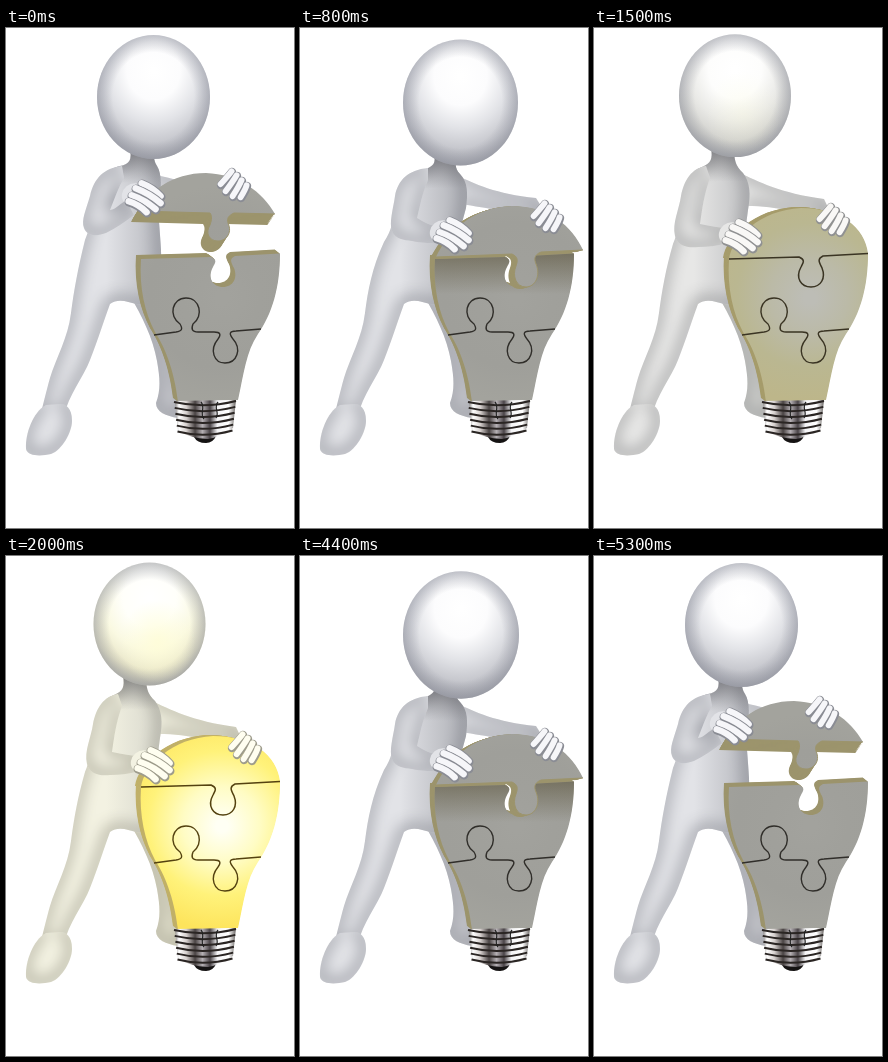
An HTML page with a canvas for the animation above (5400 ms loop, 288 px wide and 500 px high).

```html
<!DOCTYPE html>
<html lang="en">
<head>
<meta charset="utf-8">
<title>Light bulb puzzle</title>
<style>
html, body { margin: 0; width: 100%; height: 100%; overflow: hidden; background: #fff; }
canvas { display: block; }
</style>
</head>
<body>
<canvas id="stage" width="288" height="500"></canvas>
<script>
const ctx = document.getElementById('stage').getContext('2d');
const LOOP = 5400, STEP = 100, FAR = 1000;

// Timelines: [ms, values...]. Pose: 0 lifted, 1 sliding in, 2 fitted.
const POSE = [[0, 0], [100, .04], [600, .52], [700, .9], [800, 1], [1100, 1.6], [1200, 1.92], [1300, 2], [3900, 2],
  [4000, 1.6], [4300, 1], [4400, 1], [4500, .75], [5100, .06], [5300, 0], [5400, 0]];
const LIGHT = [[0, 0], [1300, 0], [2000, 1], [3900, 1], [4000, .93], [4400, 0], [5400, 0]];
const HEAD = [[0, 147.5, 69, 56.5], [300, 149, 67.5, 56.5], [700, 161, 78, 58], [800, 160.5, 74.5, 57.5], [1200, 142, 67.5, 56],
  [1300, 140, 67.5, 56], [2000, 143.5, 68, 56], [3900, 143.5, 68, 56], [4000, 148, 70.5, 57], [4400, 161, 79, 58],
  [5100, 148, 69.5, 56.5], [5300, 147.5, 69, 56.5], [5400, 147.5, 69, 56.5]];

// Shapes that change with the pose, one path per pose
const LOWER_BODY = ' C72 240 68 262 65 285 C62 310 50 330 44 350 C40 364 38 374 34 388 L58 388 C62 368 78 348 84 332 C92 312 98 292 104 276 C112 270 122 274 130 276 C140 278 150 276 156 270';
const BODY = [
  'M124 120 C126 132 124 136 114 138 C98 142 92 152 88 170 C86 190 84 200 79 212' + LOWER_BODY + ' L155 222 C154 205 153 195 152 180 C156 160 156 146 151 138 C147 132 148 126 148 120',
  'M134 126 C136 135 134 138 124 142 C106 146 100 156 97 172 C94 190 92 202 84 214' + LOWER_BODY + ' L157 222 C158 208 162 195 166 180 C168 166 168 154 160 146 C154 140 156 134 156 126',
  'M117 120 C119 131 117 135 108 139 C96 143 92 154 89 170 C87 190 84 204 79 216' + LOWER_BODY + ' L150 222 C150 210 152 198 154 182 C157 166 156 154 149 145 C141 138 140 130 140 120'];
const NEAR_ARM = [
  'M116 138 C98 140 88 150 84 168 C80 182 75 192 78 200 C81 209 92 208 100 205 C110 200 120 193 128 187 L120 172 C112 178 108 182 104 182 C108 172 112 160 118 150',
  'M128 140 C108 142 98 152 95 168 C93 182 89 194 92 203 C95 211 104 212 112 213 C122 215 128 215 136 215 L138 198 C130 198 124 194 117 190 C120 178 122 166 128 152',
  'M112 138 C98 140 90 152 87 168 C85 182 78 195 81 208 C84 219 95 220 104 219 C114 219 122 218 130 216 L134 200 C126 200 116 198 106 196 C108 182 110 166 116 150'];
const FAR_ARM = [
  'M146 146 C165 150 190 158 222 160 L228 170 C196 172 172 168 150 170',
  'M156 147 C175 156 196 166 236 170 L246 186 C210 186 190 180 160 176',
  'M144 144 C165 154 186 165 230 171 L238 188 C204 186 186 178 152 178'];
const SEAM = [
  'M269 186 L228 185 C222 188 221 190 222 195 C227 206 219 213 212 213 C203 213 199 205 204 197 C206 191 206 188 204 185 L132 183',
  'M283 222 L241 224 C234 227 234 231 236 236 C241 248 235 259 226 259 C216 259 212 248 216 238 C218 232 218 229 212 226 L136 229',
  'M274 225.5 L229 228 C223 231 225 234 228 240 C232 250 227 259 217 259 C207 259 201 250 207 239 C209 235 212 232 205 229 L135 231'];
const CAP = [
  ' C142 164 166 145 200 145 C232 146 257 164 269 186',
  ' C148 204 172 179 212 178 C249 178 272 198 283 222',
  ' C138 210 166 182 207 180 C246 180 271 199 274 225.5'];
const DEPTH = ['-7 11', '-6 2', '-6 -1'];
const NEAR_HAND = ['-14 -37', '0 0', '-5 2'];
const FAR_HAND = ['-19 -32', '0 0', '-8 3'];

// Fixed shapes
const GLASS = SEAM[2] + ' C133 260 139 285 149 304 C158 318 168 340 172 374 L232 372 C238 345 240 324 252 306 C266 286 274 260 274 225.5 Z';
const LOWER_SEAM = 'M148 307 L170 304 C176 303 177 301 174 296 C162 288 166 270 180 270 C194 270 198 288 187 296 C185 301 186 304 192 304 L208 304 C215 304 215 307 212 311 C203 322 208 335 219 335 C231 335 236 321 227 311 C223 306 223 303 230 303 L255 301';
const FAR_LEG = 'M124 268 C136 288 147 310 151 333 C154 350 155 362 150 375 C150 384 160 388 172 390 L180 380 L170 330 L150 270';
const FOOT = 'M40 377 C27 384 19 406 20 421 C22 429 36 428 45 426 C56 422 66 404 66 393 C66 380 60 376 54 376';
const NEAR_FINGERS = [[150, 193, 169, 206], [144, 198, 169, 213], [140, 205, 164, 219], [137, 211, 155, 222]];
const FAR_FINGERS = [[245, 176, 234, 189], [250, 180, 239, 196], [255, 185, 246, 201], [260, 190, 254, 202]];

const lerp = (a, b, f) => a + (b - a) * f;
const mix = (a, b, f) => `rgb(${a.map((v, i) => Math.round(lerp(v, b[i], f)))})`;

function track(keys, t) {
  const i = Math.max(1, keys.findIndex(k => k[0] > t)), a = keys[i - 1], b = keys[i];
  const f = (t - a[0]) / (b[0] - a[0]);
  return a.slice(1).map((v, n) => lerp(v, b[n + 1], f));
}

function morph(list, p) {
  const i = Math.min(1, Math.floor(p)), next = list[i + 1].match(/-?[\d.]+/g);
  let k = 0;
  return list[i].replace(/-?[\d.]+/g, n => lerp(+n, +next[k++], p - i).toFixed(2));
}
const point = (list, p) => morph(list, p).split(' ').map(Number);

function gradient(g, stops) {
  stops.forEach(([at, colour]) => g.addColorStop(at, colour));
  return g;
}

// Rounded, softly lit form: darkened towards its outline
function clay(d, base, shade, extra) {
  const path = new Path2D(d);
  ctx.save();
  ctx.fillStyle = base;
  ctx.fill(path);
  ctx.clip(path);
  ctx.translate(-FAR, 0);
  ctx.shadowOffsetX = FAR - 1;
  ctx.shadowOffsetY = -1;
  ctx.shadowBlur = 15;
  ctx.shadowColor = shade;
  ctx.lineWidth = 7;
  ctx.stroke(path);
  ctx.translate(FAR, 0);
  ctx.shadowColor = 'transparent';
  if (extra) extra();
  ctx.restore();
}

function fill(d, colour) {
  ctx.fillStyle = colour;
  ctx.fill(new Path2D(d));
}

function extrude(d, [dx, dy], colour) {
  for (let k = 10; k > 0; k--) {
    ctx.save();
    ctx.translate(dx * k / 10, dy * k / 10);
    fill(d, colour);
    ctx.restore();
  }
}

function line(d, colour, width) {
  ctx.strokeStyle = colour;
  ctx.lineWidth = width;
  ctx.stroke(new Path2D(d));
}

function fingers(list, [dx, dy], width, base, shade) {
  ctx.save();
  ctx.translate(dx, dy);
  ctx.lineCap = 'round';
  for (const [x, y, u, v] of list) {
    const bend = `Q${(x + u) / 2 + 2} ${(y + v) / 2 - 2} ${u} ${v}`;
    line(`M${x} ${y} ${bend}`, shade, width);
    ctx.translate(-.4, -.8);
    line(`M${x} ${y} ${bend}`, base, width - 2.6);
    ctx.translate(.4, .8);
  }
  ctx.restore();
}

function screw() {
  const chrome = gradient(ctx.createLinearGradient(168, 0, 230, 0), [[0, '#6b6664'], [.08, '#fff'], [.2, '#d6d0ce'],
    [.34, '#4a4444'], [.46, '#b5b0b4'], [.58, '#4a4448'], [.7, '#f4f4f6'], [.88, '#fff'], [1, '#6a6664']]);
  fill('M188 409 L210 408 Q207 415 200 415 Q191 415 188 409 Z', '#151313');
  fill('M169 373 L230 372 L227 400 Q214 409 202 411 Q184 410 172 403 Z', chrome);
  for (let i = 0; i < 6; i++) {
    const y = 374 + i * 5.9;
    line(`M${168 + i * .7} ${y} Q198 ${y + 7} ${230 - i * .7} ${y - 1}`, '#2a2523', 2);
  }
  line('M195 374 C200 380 193 386 198 391 M212 374 C207 380 214 384 210 390', '#222', 1.2);
}

function drawHead(x, y, r, lit) {
  ctx.save();
  ctx.translate(x, y);
  ctx.scale(1, 1.097);
  ctx.beginPath();
  ctx.arc(0, 0, r, 0, 7);
  ctx.fillStyle = gradient(ctx.createRadialGradient(0, -24, 2, 0, -24, 84), [
    [0, '#fff'], [.3, mix([252, 252, 253], [255, 255, 250], lit)], [.55, mix([226, 227, 231], [250, 249, 226], lit)],
    [.78, mix([198, 199, 205], [232, 229, 200], lit)], [1, mix([160, 161, 168], [186, 184, 168], lit)]]);
  ctx.fill();
  ctx.fillStyle = gradient(ctx.createRadialGradient(0, 0, r * .72, 0, 0, r), [[0, 'rgba(140,143,155,0)'], [1, 'rgba(140,143,155,.5)']]);
  ctx.fill();
  ctx.fillStyle = gradient(ctx.createRadialGradient(8, 16, 2, 8, 16, 38), [[0, `rgba(255,253,215,${lit * .8})`], [1, 'rgba(255,253,215,0)']]);
  ctx.fill();
  ctx.restore();
}

function draw(t) {
  const [p] = track(POSE, t), [lit] = track(LIGHT, t), [hx, hy, hr] = track(HEAD, t);
  const base = mix([226, 227, 231], [243, 242, 226], lit);
  const shade = mix([138, 140, 148], [158, 156, 140], lit);
  const white = mix([246, 246, 249], [255, 254, 240], lit);
  const side = mix([156, 148, 108], [192, 176, 104], lit);
  const ink = mix([48, 46, 42], [84, 66, 16], lit);
  const face = gradient(ctx.createRadialGradient(216, 270, 6, 214, 266, 108), [
    [0, mix([162, 162, 157], [255, 255, 244], lit)],
    [.32, mix([160, 160, 155], [255, 252, 196], lit)],
    [.65, mix([159, 159, 154], [255, 242, 122], lit)],
    [1, mix([163, 163, 157], [253, 228, 92], lit)]]);

  ctx.fillStyle = '#fff';
  ctx.fillRect(0, 0, 288, 500);

  clay(FAR_LEG, mix([200, 201, 206], [226, 224, 204], lit), shade);
  clay(morph(FAR_ARM, p), base, shade);
  clay(morph(BODY, p), base, shade, () => {
    ctx.fillStyle = gradient(ctx.createLinearGradient(100, 0, 160, 0), [[0, 'rgba(120,122,130,0)'], [1, `rgba(120,122,130,${.45 - lit * .2})`]]);
    ctx.fillRect(100, 120, 80, 165);
    ctx.fillStyle = gradient(ctx.createLinearGradient(0, hy + 54, 0, hy + 86), [[0, 'rgba(95,95,100,.65)'], [1, 'rgba(120,120,124,0)']]);
    ctx.fillRect(80, hy + 40, 110, 50);
  });
  clay(FOOT, base, shade);
  drawHead(hx, hy, hr, lit);

  // Bulb; the fitted piece shows its side only along the outer rim
  const seam = morph(SEAM, p), piece = seam + morph(CAP, p) + ' Z', depth = point(DEPTH, p), fitted = p > 1.9;
  if (fitted) extrude(piece, depth, side);
  extrude(GLASS, [-5, -4], side);
  fill(GLASS, face);
  const gap = Math.min(1, 2 - 2 * Math.abs(p - 1));
  fill(GLASS, gradient(ctx.createLinearGradient(0, 226, 0, 266), [[0, `rgba(80,72,44,${gap * .5})`], [1, 'rgba(80,72,44,0)']]));
  line(LOWER_SEAM, ink, 1.4);
  screw();
  if (!fitted) extrude(piece, depth, side);
  fill(piece, face);
  line(seam, fitted ? ink : side, fitted ? 1.5 : 1);

  // Arm and hands over the piece
  clay(morph(NEAR_ARM, p), base, shade);
  const near = point(NEAR_HAND, p);
  ctx.fillStyle = base;
  ctx.beginPath();
  ctx.ellipse(141 + near[0], 203 + near[1], 12, 10, -.7, 0, 7);
  ctx.fill();
  fingers(NEAR_FINGERS, near, 9, white, shade);
  fingers(FAR_FINGERS, point(FAR_HAND, p), 8.4, white, shade);
}

function frame() {
  const t = performance.now() % LOOP;
  draw(Math.floor(t / STEP) * STEP);
  requestAnimationFrame(frame);
}
frame();
</script>
</body>
</html>
```
